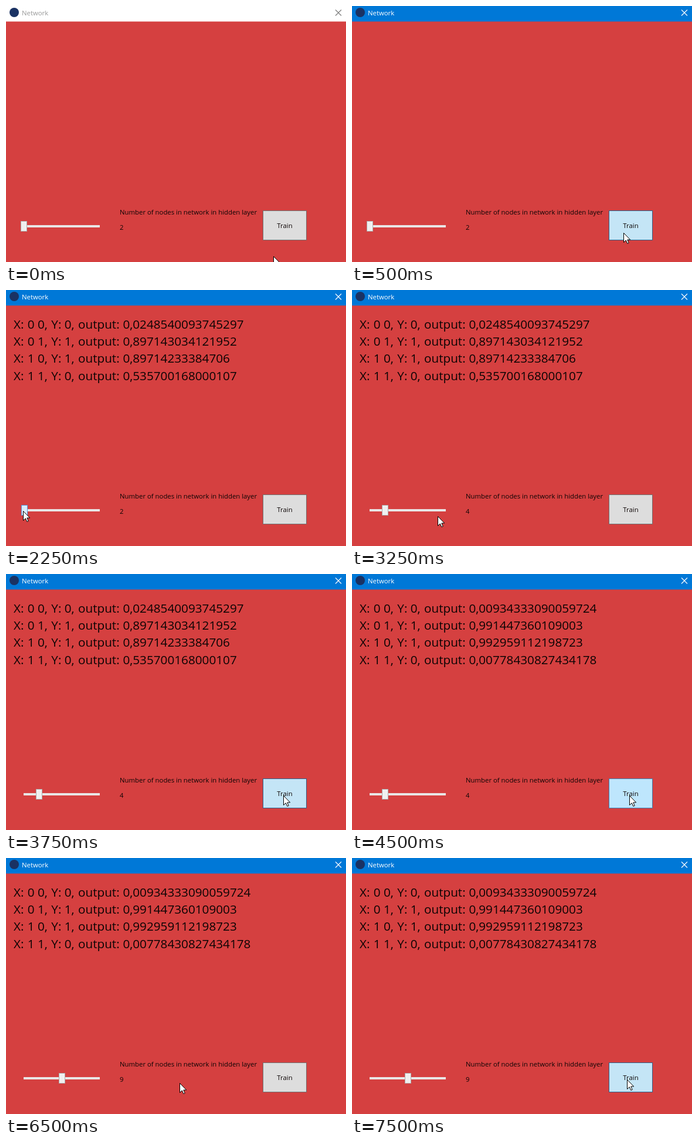
Animation of 580 by 437 pixels, one loop 8000 ms. Source, as an HTML page:

```html
<!DOCTYPE html>
<html lang="en">
<head>
<meta charset="utf-8">
<title>Network</title>
<style>
  html, body { margin: 0; width: 100%; height: 100%; overflow: hidden; background: #d54040; }
  svg { display: block; width: 580px; height: 437px; }
  text { font-family: "Open Sans", "Noto Sans", sans-serif; font-size: 11.35px; fill: #0c0404; white-space: pre; }
  .row text { font-size: 20.7px; }
</style>
</head>
<body>
<svg viewBox="0 0 580 437" xmlns="http://www.w3.org/2000/svg">
  <rect width="580" height="437" fill="#d54040"/>
  <rect id="bar" width="580" height="26.5"/>
  <circle cx="14" cy="11" r="8" fill="#1a3263"/>
  <text id="title" x="27" y="16">Network</text>
  <path id="close" d="M562 6.5l10 10m0-10l-10 10" fill="none" stroke-width="1.1"/>

  <g id="rows" class="row"></g>

  <rect x="30" y="374" width="130" height="4" fill="#e9e6e6"/>
  <rect id="thumb" y="367.5" width="10" height="17"/>
  <text x="194" y="356">Number of nodes in network in hidden layer</text>
  <text id="count" x="194" y="382"></text>

  <rect id="button" x="438.5" y="349.5" width="74" height="50"/>
  <text x="475.5" y="379" text-anchor="middle">Train</text>

  <path id="cursor" d="M.5 .5V16.5L4.3 12.9L6.8 18.5L9.2 17.5L6.8 12H11.7Z" fill="#fff" stroke="#000"/>
</svg>
<script>
const $ = id => document.getElementById(id);
const set = (id, attrs) => {
  for (const k in attrs) $(id).setAttribute(k, attrs[k]);
};

// All tracks hold each value until the next key; times are in steps of 250 ms.
const STEP = 250, LOOP = 32;

const cursor = [
  [0, 456, 427], [1, 462, 395], [2, 463, 387], [6, 174, 381], [7, 46, 381],
  [8, 30, 376], [9, 29, 377], [10, 37, 378], [11, 49, 379], [12, 57, 391],
  [13, 146, 386], [14, 458, 394], [15, 473, 378], [19, 372, 376], [20, 81, 372],
  [21, 58, 371], [22, 60, 374], [23, 85, 376], [24, 98, 378], [26, 296, 384],
  [27, 500, 380], [28, 469, 378]
];
const thumbX = [[0, 25], [9, 26], [10, 34], [11, 45], [12, 51], [23, 76], [24, 90]];
const thumbLook = [[0, "idle"], [8, "hover"], [9, "drag"], [13, "idle"], [21, "hover"], [22, "drag"], [26, "idle"]];
const nodes = [[0, 2], [10, 3], [12, 4], [23, 7], [24, 9]];
const buttonLook = [
  [0, "idle"], [1, "hover"], [2, "down"], [4, "hover"], [6, "idle"], [14, "hover"],
  [15, "down"], [18, "hover"], [19, "idle"], [27, "hover"], [28, "down"]
];
const results = [
  [0, []],
  [4, ["0,0248540093745297", "0,897143034121952", "0,89714233384706", "0,535700168000107"]],
  [18, ["0,00934333090059724", "0,991447360109003", "0,992959112198723", "0,00778430827434178"]]
];

const thumbColors = { idle: ["#f0f0f0", "#acacac"], hover: ["#dcecfc", "#7eb4ea"], drag: ["#daecfc", "#569de5"] };
const buttonColors = { idle: ["#dddddd", "#707070"], hover: ["#bee6fd", "#3c7fb1"], down: ["#c4e5f6", "#2c628b"] };

const at = (track, q) => track.reduce((found, key) => key[0] <= q ? key : found);
const paint = ([fill, stroke]) => ({ fill, stroke });

function resultRow(value, i) {
  const a = i >> 1, b = i & 1, y = [66, 95, 124, 154][i];
  const parts = [[13, "X:"], [36.8, `${a} ${b},`], [77.3, `Y: ${a ^ b},`], [123, "output:"], [199.4, value]];
  return parts.map(([x, s]) => `<text x="${x}" y="${y}">${s}</text>`).join("");
}

let shown = null;

function draw(ms) {
  const q = Math.floor(ms / STEP) % LOOP;
  const active = q >= 2;
  set("bar", { fill: active ? "#0078d7" : "#ffffff" });
  $("title").style.fill = active ? "#ffffff" : "#999999";
  set("close", { stroke: active ? "#ffffff" : "#7a7a7a" });

  const values = at(results, q)[1];
  if (values !== shown) {
    $("rows").innerHTML = values.map(resultRow).join("");
    shown = values;
  }

  set("thumb", { x: at(thumbX, q)[1] + 0.5, ...paint(thumbColors[at(thumbLook, q)[1]]) });
  $("count").textContent = at(nodes, q)[1];
  set("button", paint(buttonColors[at(buttonLook, q)[1]]));

  const [, x, y] = at(cursor, q);
  set("cursor", { transform: `translate(${x} ${y})` });
}

const start = performance.now();
function tick() {
  draw(performance.now() - start);
  requestAnimationFrame(tick);
}
tick();
</script>
</body>
</html>
```
